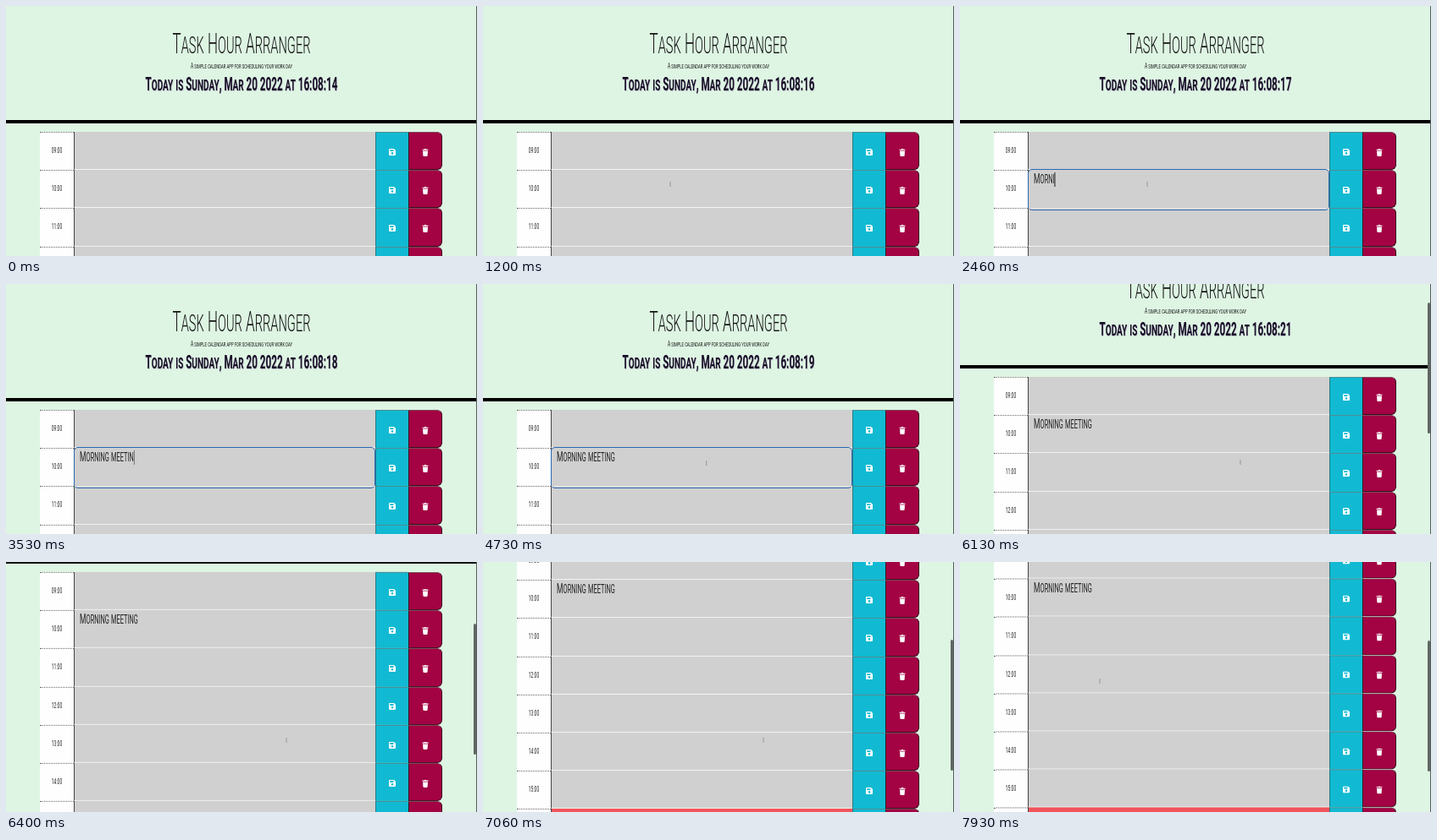
Write an HTML page that moves like this. It is 556 by 296 pixels and loops after 8 s.

```html
<!DOCTYPE html>
<html lang="en">
<head>
<meta charset="utf-8">
<title>Day planner</title>
<style>
  html, body { margin: 0; width: 100%; height: 100%; overflow: hidden; }
  body { position: relative; font-family: Roboto, "Open Sans", sans-serif; font-weight: 300; color: #111;
    background: #def5e3; }
  div, svg, .type { position: absolute; box-sizing: border-box; }
  #page { left: 0; top: 0; width: 556px; height: 565px; }
  #rule { top: 135px; width: 556px; height: 4px; background: #000; }

  /* one narrow small-caps face for the whole page; top is the middle of the capitals */
  .type { line-height: 0; white-space: pre; text-transform: uppercase; transform: scaleX(.52); }
  .type small { font-size: .86em; }
  .center { left: 0; width: 556px; text-align: center; }
  #title { top: 45px; font-size: 32.8px; }
  #tagline { top: 71px; font-size: 9.4px; font-weight: 400; }
  #clock { top: 92px; font-size: 22.4px; font-weight: 600; color: #170d26; text-shadow: 1px 1px 1px #8b6fa866; }

  .row { left: 40px; width: 475px; height: 45.2px; }
  .row > div { top: 0; height: 100%; }
  .hour { left: 0; width: 40px; background: #fefefe; border-top: 1px dotted #666; }
  .hour .type { top: 21px; left: 0; width: 40px; text-align: center; font-size: 9.65px; font-weight: 400; color: #222; }
  .slot { left: 40px; width: 356px; background: #d0d0d0; border-left: 1px solid #444; border-bottom: 1px solid #f2f2f2; }
  .now .slot { background: #f2545b; }
  .later .slot { background: #77dd77; }
  .save { left: 396px; width: 39px; background: #11bad2; border-left: 1px solid #2b7783; border-top: 1px solid #4f8c94; }
  .save.hover { border-color: #6fd0dc; }
  .bin { left: 435px; width: 40px; background: #a30243; border: 1px solid #3a0a1d; border-top-color: #7d4a5b; border-radius: 0 6px 6px 0; }
  .row svg { top: 18.8px; fill: #fff; }
  .save svg { left: 14.5px; width: 8px; height: 8px; }
  .bin svg { left: 15px; width: 8px; height: 9px; }

  #ring { left: 80px; top: 193px; width: 356px; height: 49px; border: 1px solid #2a69b4; border-radius: 5px; background: #d0d0d0; }
  #ring::after { content: ""; position: absolute; left: 0; right: 0; top: 45px; height: 1px; background: #e4e4e4; }
  #note { left: 87px; top: 205px; font-size: 16.6px; font-weight: 400; color: #222; transform-origin: 0 0; }
  #note i { position: absolute; top: -8.5px; width: 1.5px; height: 17px; background: #222; }

  #thumb { left: 551.5px; width: 3px; height: 155px; border-radius: 2px; background: #606763; }
  #edge { left: 555px; top: 0; width: 1px; height: 100%; background: #55605a; }
  #pointer { left: 0; top: 0; overflow: visible; }
</style>
</head>
<body>
<div id="page">
  <span class="type center" id="title"></span>
  <span class="type center" id="tagline"></span>
  <span class="type center" id="clock"></span>
  <div id="rule"></div>
  <div id="rows"></div>
  <div id="ring"></div>
  <span class="type" id="note"></span>
</div>
<div id="thumb"></div>
<div id="edge"></div>
<svg id="pointer" width="1" height="1">
  <path id="beam" d="M0 -3V3" fill="none" stroke="#888" stroke-width=".8"/>
  <path id="hand" d="M-3 -1H0V-3H1L2 -1H4V2L3 4H0L-3 1Z" fill="#fff" stroke="#333" stroke-width=".6"/>
</svg>
<script>
const LOOP = 8000;
const $ = id => document.getElementById(id);
const caps = text => text.replace(/[a-z]+/g, run => `<small>${run}</small>`);
const pad = n => String(n).padStart(2, '0');

const NOTE = 'Morning meeting';
const KEY_TIMES = [2000, 2200, 2270, 2330, 2460, 2530, 2600, 2730, 2930, 3030, 3130, 3260, 3400, 3530, 3860];
const FOCUS = [1330, 5060];
const CARET_OFF = [[1860, 2000], [4460, 4900]];

// time, then value(s)
const SCROLL = [[6000, 0], [6100, 25], [6200, 70], [6300, 110], [6400, 137], [6600, 158], [6800, 168], [7060, 173], [7200, 174.5]];
const POINTER = [[60, 290, 302], [330, 285, 286], [1130, 221, 211], [4600, 221, 211], [5300, 449, 217],
  [5600, 449, 217], [5860, 331, 211], [7460, 331, 211], [7600, 300, 197], [7930, 165, 141]];

const within = (t, [from, to]) => t >= from && t < to;

function sample(steps, t) {
  const next = steps.findIndex(step => step[0] > t);
  if (next === 0) return steps[0].slice(1);
  if (next < 0) return steps[steps.length - 1].slice(1);
  const [a, b] = [steps[next - 1], steps[next]];
  const k = (t - a[0]) / (b[0] - a[0]);
  return a.slice(1).map((v, i) => v + (b[i + 1] - v) * k);
}

function rowMarkup(hour, i) {
  const state = hour === 16 ? 'now' : hour > 16 ? 'later' : '';
  return `<div class="row ${state}" style="top:${149 + 45.2 * i}px">
    <div class="hour"><span class="type">${pad(hour)}:00</span></div>
    <div class="slot"></div>
    <div class="save"><svg viewBox="0 0 8 8"><path fill-rule="evenodd"
      d="M0 1Q0 0 1 0H6L8 2V7Q8 8 7 8H1Q0 8 0 7ZM1.2 1.2H5.5V3H1.2ZM2.7 5.4a1.3 1.3 0 1 0 2.6 0a1.3 1.3 0 1 0 -2.6 0Z"/></svg></div>
    <div class="bin"><svg viewBox="0 0 8 9"><path d="M.5 .7H2.6L3 0H5L5.4 .7H7.5V1.8H.5ZM1 2.5H7L6.6 8.2Q6.5 9 5.8 9H2.2Q1.5 9 1.4 8.2Z"/></svg></div>
  </div>`;
}

$('title').innerHTML = caps('Task Hour Arranger');
$('tagline').innerHTML = caps('A simple calendar app for scheduling your work day');
$('rows').innerHTML = Array.from({ length: 9 }, (_, i) => rowMarkup(9 + i, i)).join('');
const noteSave = document.querySelectorAll('.save')[1];

const shown = {};
function setHTML(id, html) {
  if (shown[id] !== html) $(id).innerHTML = shown[id] = html;
}

function render(t) {
  const seconds = 14 + Math.floor((t + 940) / 1000);
  setHTML('clock', caps(`Today is Sunday, Mar 20 2022 at 16:08:${pad(seconds)}`));

  const focused = within(t, FOCUS);
  const typed = KEY_TIMES.filter(time => t >= time).length;
  const caret = focused && !CARET_OFF.some(span => within(t, span));
  $('ring').style.display = focused ? '' : 'none';
  setHTML('note', caps(NOTE.slice(0, typed)) + (caret ? '<i></i>' : ''));

  const [scroll] = sample(SCROLL, t);
  $('page').style.transform = `translateY(${-scroll}px)`;
  $('thumb').style.top = `${1.5 + scroll * 296 / 565}px`;
  $('thumb').style.display = t >= 6000 ? '' : 'none';

  const [x, y] = sample(POINTER, t);
  const overButton = x > 436;
  noteSave.classList.toggle('hover', overButton);
  $('pointer').style.transform = `translate(${x}px, ${y}px)`;
  $('pointer').style.display = within(t, [2530, 4600]) ? 'none' : '';
  $('beam').style.display = overButton ? 'none' : '';
  $('hand').style.display = overButton ? '' : 'none';
}

function frame() {
  render(performance.now() % LOOP);
  requestAnimationFrame(frame);
}
frame();
</script>
</body>
</html>
```
